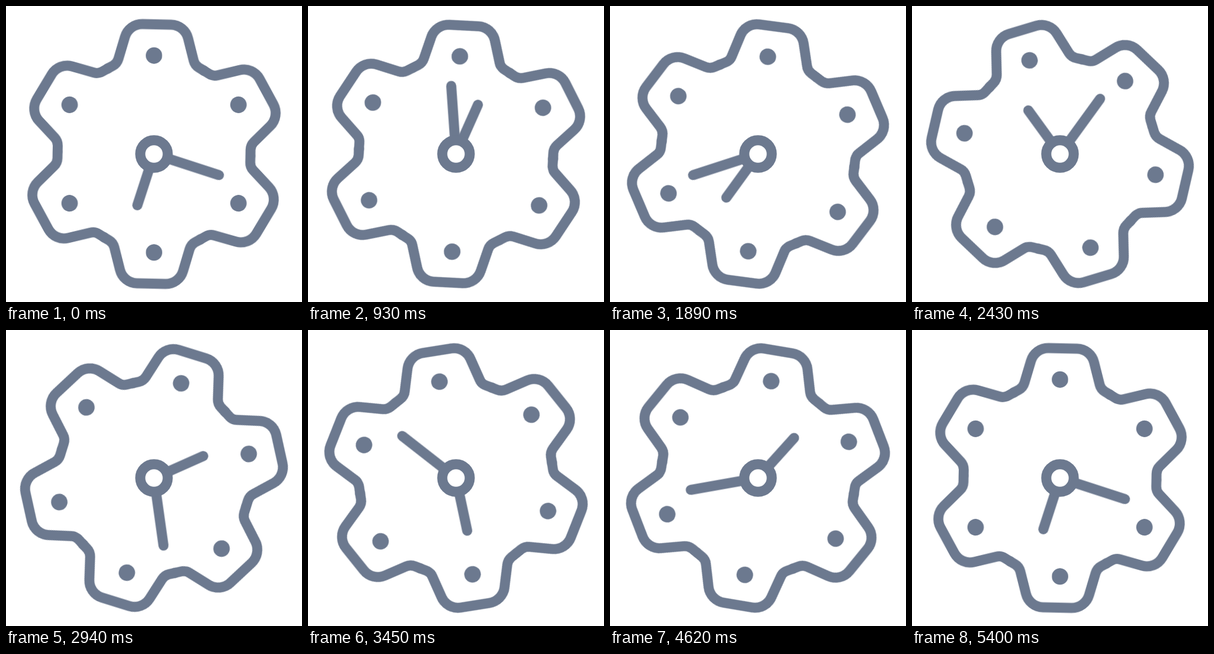
Write an HTML page that moves like this. It is 500 by 500 pixels and loops after 5430 ms.

```html
<!DOCTYPE html>
<html lang="en">
<head>
<meta charset="utf-8">
<title>Gear clock</title>
<style>
  html, body { margin: 0; width: 100%; height: 100%; overflow: hidden; background: #fff; }
  svg { display: block; width: 100%; height: 100%; }
  .line { fill: none; stroke: #6c798f; stroke-width: 17; stroke-linecap: round; }
  .dots { fill: #6c798f; }
  .line.hub { fill: #fff; }

  /* 180 ticks of 30 ms, then one tick of rest; the small delay keeps ticks off their edges */
  .spin {
    transform-origin: 0 0;
    animation: spin 5430ms -2ms infinite;
  }
  .gear   { --from: 0deg;   --sweep: 360deg; }
  .hour   { --from: 198deg; --sweep: 1080deg; }
  .minute { --from: 108deg; --sweep: 1440deg; }

  @keyframes spin {
    0% {
      transform: rotate(var(--from));
      animation-timing-function: steps(180, end);
    }
    99.4475%, 100% { transform: rotate(calc(var(--from) + var(--sweep))); }
  }
</style>
</head>
<body>
<svg viewBox="0 0 500 500">
  <defs>
    <path id="tooth" d="M-82.3-142.5L-73.2-147.7A19 19 0 0 0-64.3-159.1L-53.9-196.6A30.5 30.5 0 0 1-24.5-219H24.5A30.5 30.5 0 0 1 53.9-196.6L64.3-159.1A19 19 0 0 0 73.2-147.7L82.3-142.5"/>
    <circle id="dot" cy="-166.3" r="14"/>
  </defs>
  <g transform="translate(250 250)">
    <g class="spin gear">
      <!-- the gear is slightly narrower than it is tall -->
      <g transform="scale(.99 1)">
        <g class="line" transform="rotate(1.25)">
          <use href="#tooth"/>
          <use href="#tooth" transform="rotate(60)"/>
          <use href="#tooth" transform="rotate(120)"/>
          <use href="#tooth" transform="rotate(180)"/>
          <use href="#tooth" transform="rotate(240)"/>
          <use href="#tooth" transform="rotate(300)"/>
        </g>
        <g class="dots">
          <use href="#dot"/>
          <use href="#dot" transform="rotate(60)"/>
          <use href="#dot" transform="rotate(120)"/>
          <use href="#dot" transform="rotate(180)"/>
          <use href="#dot" transform="rotate(240)"/>
          <use href="#dot" transform="rotate(300)"/>
        </g>
      </g>
    </g>
    <path class="line spin hour" d="M0-23V-91"/>
    <path class="line spin minute" d="M0-23V-115.2"/>
    <circle class="line hub" r="23.2"/>
  </g>
</svg>
</body>
</html>
```
